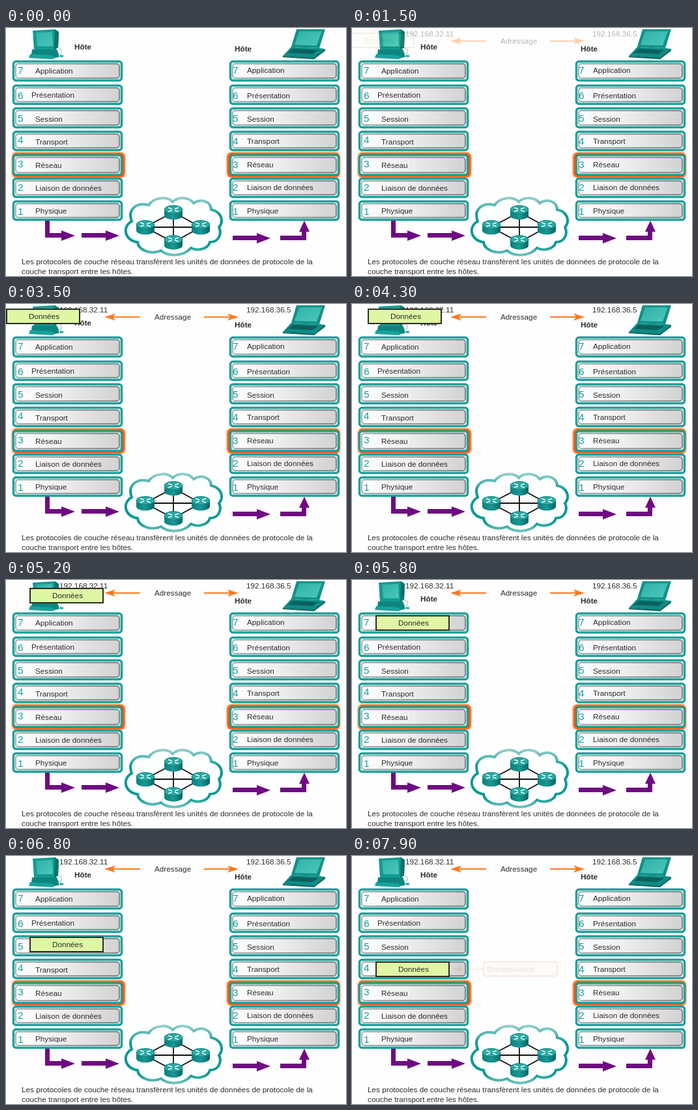
An HTML page for the animation above (8000 ms loop, 522 by 381 pixels).

```html
<!DOCTYPE html>
<html lang="fr">
<head>
<meta charset="utf-8">
<title>Couche réseau</title>
<style>
html, body { margin: 0; width: 100%; height: 100%; overflow: hidden; background: #fefefe; }
svg { display: block; width: 522px; height: 381px; }
text { font: 11.75px "Liberation Sans", Arial, sans-serif; fill: #2c2c2c; white-space: pre; }
.num { font-size: 15.5px; fill: #12a097; }
.bold { font-weight: bold; }
</style>
</head>
<body>
<svg viewBox="0 0 522 381" xmlns="http://www.w3.org/2000/svg">
  <defs>
    <linearGradient id="bar">
      <stop offset="0" stop-color="#fff"/>
      <stop offset=".4" stop-color="#f0f0f0"/>
      <stop offset="1" stop-color="#d2d2d3"/>
    </linearGradient>
    <linearGradient id="bevel">
      <stop offset="0" stop-color="#a9b0b0"/>
      <stop offset="1" stop-color="#858989"/>
    </linearGradient>
    <linearGradient id="side">
      <stop offset="0" stop-color="#0c7f7d"/>
      <stop offset=".5" stop-color="#1a9995"/>
      <stop offset="1" stop-color="#086464"/>
    </linearGradient>
    <linearGradient id="glass" x2="1" y2="1">
      <stop offset="0" stop-color="#2fb0a6"/>
      <stop offset="1" stop-color="#4cc8bc"/>
    </linearGradient>
    <linearGradient id="rim" x2="0" y2="1">
      <stop offset="0" stop-color="#8fcfca"/>
      <stop offset=".3" stop-color="#0c9a93"/>
      <stop offset=".85" stop-color="#0c9a93"/>
      <stop offset="1" stop-color="#6fc3bd"/>
    </linearGradient>
    <filter id="glow" x="-10%" y="-40%" width="120%" height="180%">
      <feGaussianBlur stdDeviation="1.2"/>
    </filter>
    <g id="router">
      <path d="M-14-4V5A14 6.5 0 0 0 14 5V-4Z" fill="url(#side)"/>
      <ellipse cy="-4" rx="14" ry="6.5" fill="#2ba7a1" stroke="#0b7674" stroke-width=".8"/>
      <path d="M-8-7L-2-5M8-1L2-3M-8-1L-2-3M8-7L2-5" stroke="#e8ffff" stroke-width="1.5"/>
    </g>
  </defs>

  <!-- desktop computer -->
  <g>
    <path d="M81 30Q89 34 83 40" fill="none" stroke="#7fb5b2" stroke-width="1"/>
    <ellipse cx="85" cy="43" rx="3.5" ry="2" fill="#4ab0aa"/>
    <path d="M41 4L75 2 81 6 80 30 74 34 43 33Z" fill="#139a92"/>
    <path d="M75 2L81 6 80 30 74 34Z" fill="#0a726e"/>
    <path d="M46 7L71 6 72 28 48 28Z" fill="url(#glass)"/>
    <path d="M40 33H78L81 40V45L74 46 39 41Z" fill="#0d8680"/>
    <path d="M37 40L70 42 76 46 71 48 35 46Z" fill="#17a39a"/>
  </g>

  <!-- laptop -->
  <g>
    <path d="M446 2L490 2 481 31 438 29Z" fill="#109088"/>
    <path d="M450 5L485 5 477 27 443 26Z" fill="url(#glass)"/>
    <path d="M438 29L481 31 490 32 473 47 425 43Z" fill="#0f8a84"/>
    <path d="M440 32L479 34 470 40 433 38Z" fill="#0a5f5d"/>
    <path d="M425 43L473 46 490 32V35L473 48 425 45Z" fill="#086561"/>
  </g>

  <text class="bold" x="105" y="33">Hôte</text>
  <text class="bold" x="351" y="36">Hôte</text>
  <g id="rows"></g>

  <path d="M193 297C186 279 200 267 219 272C227 260 247 258 256 267C264 258 282 260 288 269C300 261 315 267 315 279C331 282 335 297 327 306C332 317 326 329 313 329C310 340 294 343 284 338C272 352 248 351 238 342C222 349 203 341 202 329C183 327 177 306 193 297Z"
        fill="#fdfefe" stroke="url(#rim)" stroke-width="4"/>
  <path d="M257 283L213 306 257 329 299 306ZM257 283V329M213 306H299" fill="none" stroke="#111" stroke-width="1.8"/>
  <use href="#router" x="257" y="283"/>
  <use href="#router" x="214" y="306"/>
  <use href="#router" x="299" y="306"/>
  <use href="#router" x="257" y="329"/>

  <g fill="#6f0a82">
    <path d="M60 296H67V315H85V311L106 319 85 327V322H60Z"/>
    <path d="M116 315H153V311L174 319 153 327V322H116Z"/>
    <path d="M348 319H385V315L406 323 385 331V326H348Z"/>
    <path d="M421 319H454V313H450L458 296 466 313H461V326H421Z"/>
  </g>

  <text x="24" y="363">Les protocoles de couche réseau transfèrent les unités de données de protocole de la</text>
  <text x="24" y="378">couche transport entre les hôtes.</text>

  <g id="addressing">
    <text x="82" y="13">192.168.32.11</text>
    <text x="369" y="13">192.168.36.5</text>
    <text x="228" y="24">Adressage</text>
    <path d="M163 20H206M304 20H347" stroke="#fb7a22" stroke-width="2"/>
    <path d="M151 20L168 14.5 164 20 168 25.5ZM357 20L340 14.5 344 20 340 25.5Z" fill="#fb7a22"/>
  </g>

  <g id="encapsulation">
    <rect x="202" y="162.5" width="113" height="22" rx="2" fill="#fbe2d6" stroke="#e2501c" stroke-width="2"/>
    <text x="207" y="177.5">Encapsulation</text>
    <path d="M164 174H202" stroke="#fb7a22" stroke-width="2"/>
    <path d="M154 174L171 168.5 167 174 171 179.5Z" fill="#fb7a22"/>
  </g>

  <g id="data">
    <rect x="1" y="1" width="112" height="22" fill="#dff6a4" stroke="#2b2d22" stroke-width="2"/>
    <text x="35" y="16">Données</text>
  </g>
</svg>
<script>
const LOOP = 8000, STEP = 100;
const byId = id => document.getElementById(id);

// name, label indent, top, bottom, then baselines: left number, left label, right number, right label
const layers = [
  ["Application", 35, 50, 82, 70, 70, 70, 69],
  ["Présentation", 29, 87, 118, 109, 107, 109, 108],
  ["Session", 35, 122, 154, 144, 144, 144, 144],
  ["Transport", 35, 158, 189, 177, 179, 179, 178],
  ["Réseau", 35, 194, 227, 214, 215, 215, 214],
  ["Liaison de données", 35, 230, 261, 250, 250, 250, 249],
  ["Physique", 35, 265, 296, 287, 285, 287, 285]
];

const rect = (x, y, w, h, attrs) =>
  `<rect x="${x}" y="${y}" width="${w}" height="${h}" ${attrs}/>`;

function row(x, number, name, indent, top, bottom, numberY, labelY) {
  const h = bottom - top, isLeft = x < 100;
  const glow = name === "Réseau"
    ? rect(isLeft ? x : x - 3, top - 2, 172, h + 4, 'rx="6" fill="#ff5a08" stroke="#ff5a08" stroke-width="2" filter="url(#glow)"')
    : "";
  return glow
    + rect(x + 1.5, top + 1.5, 166, h - 3, 'rx="4" fill="#eef6f5" stroke="#0c968f" stroke-width="3.4"')
    + rect(x + 2, top + 2, 165, h - 4, 'rx="4" fill="none" stroke="#3fbab2" stroke-width="1"')
    + rect(x + 5, top + 5, 159, h - 10, 'rx="4" fill="url(#bar)" stroke="url(#bevel)" stroke-width="2"')
    + `<text class="num" x="${x + (isLeft ? 8 : 5)}" y="${numberY}">${number}</text>`
    + `<text x="${x + indent}" y="${labelY}">${name}</text>`;
}

byId("rows").innerHTML = layers.map(([name, indent, top, bottom, ln, ll, rn, rl], i) =>
  row(10, 7 - i, name, indent, top, bottom, ln, ll) +
  row(343, 7 - i, name, 27, top, bottom, rn, rl)).join("");

// Each step is [time in ms, value]; the whole loop advances in ticks of STEP.
// The small lead keeps every tick clear of its boundary.
function play(id, property, steps) {
  const full = [[0, steps[0][1]], ...steps, [LOOP, steps[steps.length - 1][1]]];
  const frames = full.map(([ms, value]) => ({ offset: ms / LOOP, [property]: value }));
  byId(id).animate(frames, {
    duration: LOOP, iterations: Infinity, delay: -20, easing: `steps(${LOOP / STEP})`
  });
}

const at = (x, y) => `translate(${x}px, ${y}px)`;

play("addressing", "opacity", [[400, 0], [3600, 1]]);
play("data", "opacity", [[1400, 0], [2700, 1]]);
play("data", "transform", [
  [2900, at(-18, 7)], [4700, at(36, 7)],
  [5100, at(36, 7)], [5200, at(36, 12)], [7300, at(36, 159)], [7400, at(36, 162)]
]);
play("encapsulation", "opacity", [[7900, 0], [7900, 0.12]]);
</script>
</body>
</html>
```
